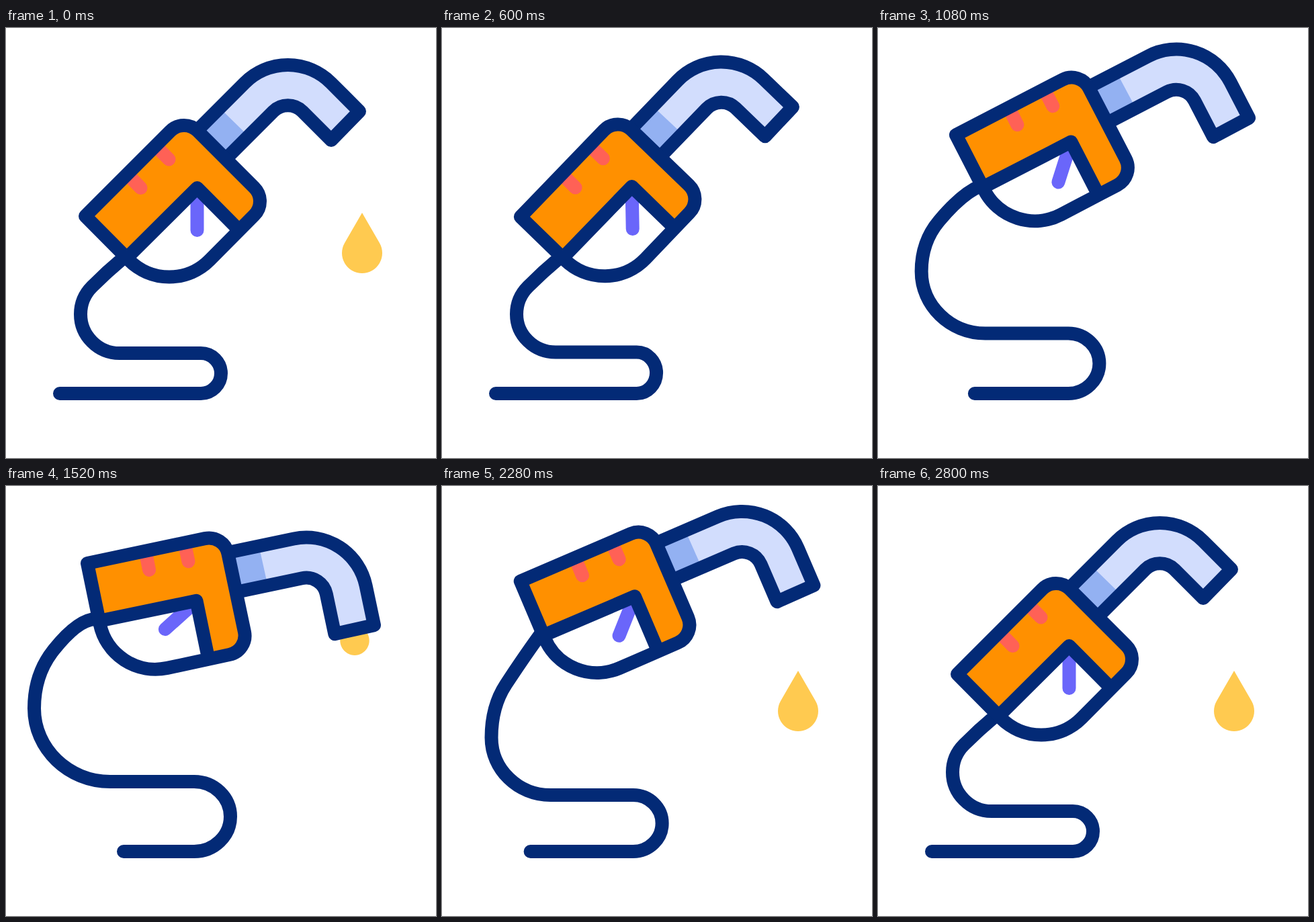
Recreate the animation shown at these times as an HTML page. Size 640 by 640 pixels, loop 3 s.

```html
<!DOCTYPE html>
<html lang="en">
<head>
<meta charset="utf-8">
<title>Fuel nozzle</title>
<style>
  html, body { margin: 0; width: 100%; height: 100%; overflow: hidden; background: #fff; }
  svg { display: block; width: 100vw; height: 100vh; }
  .line { fill: none; stroke: #032a76; stroke-width: 20; stroke-linecap: round; stroke-linejoin: round; }
  .mark { fill: none; stroke: #ff6156; stroke-width: 20; stroke-linecap: round; }
</style>
</head>
<body>
<svg viewBox="0 0 640 640">
  <path id="drop" fill="#ffca50" d="M0-60L26-15A30 30 0 1 1-26-15Z"/>
  <path id="hose" class="line"/>
  <g id="pump">
    <path fill="#d2ddfd" d="M290 147L355.5 81.5A90.5 90.5 0 0 1 483.5 81.5L526 124L484 167L441 124A30.5 30.5 0 0 0 398 124L332 190Z"/>
    <path fill="#93b1f2" d="M290 147L318 119L362 162L332 190Z"/>
    <path class="line" d="M290 147L355.5 81.5A90.5 90.5 0 0 1 483.5 81.5L526 124L484 167L441 124A30.5 30.5 0 0 0 398 124L332 190"/>
    <path fill="#fff" d="M180 342L183 345.5A84.5 84.5 0 0 0 303 345.5L347 301L284.5 238Z"/>
    <path id="lever" class="mark" style="stroke:#6a66fa" d="M284.5 240V301"/>
    <path fill="#ff9000" d="M118 280L244.5 153.5A29 29 0 0 1 285.5 153.5L369.5 237.5A29 29 0 0 1 369.5 278.5L347 301L284.5 238L180 342Z"/>
    <path class="mark" d="M223 176L242.5 195.5M181 218L200.5 238"/>
    <path class="line" d="M118 280L244.5 153.5A29 29 0 0 1 285.5 153.5L369.5 237.5A29 29 0 0 1 369.5 278.5L303 345.5A84.5 84.5 0 0 1 183 345.5ZM180 342L284.5 238L347 301"/>
  </g>
</svg>
<script>
const LOOP = 3000;
const [drop, hose, pump, lever] = ['drop', 'hose', 'pump', 'lever'].map(id => document.getElementById(id));

const ramp = (t, from, to) => Math.min(1, Math.max(0, (t - from) / (to - from)));
const easeOut = u => 1 - (1 - u) ** 1.6;
const glide = u => u + 0.12 * u * (1 - u);
// Rises from a to b, returns from c to d.
const swing = (t, ease, a, b, c, d) => ease(ramp(t, a, b)) - ease(ramp(t, c, d));

// joint x, y; left bulge x, y; middle line x, y; loop start x, loop right x; end x
const HOSE_REST = [128, 385, 111, 426, 169, 484, 290, 320, 80];
const HOSE_LIFT = [71, 244, 42, 331, 155, 440, 280, 334, 175];
const HOSE_KICK = [0, 0, 0, 0, 0, -11, -2, -7, 0];
const FLOOR = 544;

function hosePath(bx, by, lift, kick) {
  let [jx, jy, lx, ly, mx, my, sx, rx, ex] =
    HOSE_REST.map((v, i) => v + lift * (HOSE_LIFT[i] - v) + kick * HOSE_KICK[i]);
  // The joint follows the pump when the two are out of step.
  jx += 0.3 * (bx - (175 - 40 * lift));
  jy += 0.3 * (by - (342 - 144 * lift));
  const cx = jx - 0.65 * (jx - lx), cy = jy + 0.27 * (ly - jy);
  const w = rx - sx, h = (FLOOR - my) / 2;
  return `M${bx} ${by}Q${3 * jx - 2 * cx} ${3 * jy - 2 * cy} ${jx} ${jy}` +
    `C${cx} ${cy} ${lx} ${ly - 0.39 * (ly - jy)} ${lx} ${ly}` +
    `C${lx} ${ly + 0.55 * (my - ly)} ${mx - 0.55 * (mx - lx)} ${my} ${mx} ${my}H${sx}` +
    `C${sx + 0.55 * w} ${my} ${rx} ${my + 0.45 * h} ${rx} ${my + h}` +
    `C${rx} ${FLOOR - 0.45 * h} ${sx + 0.55 * w} ${FLOOR} ${sx} ${FLOOR}H${ex}`;
}

function draw(t) {
  const kick = swing(t, easeOut, 120, 400, 400, 680);
  const tilt = swing(t, glide, 800, 1360, 2040, 2800);
  const lift = swing(t, easeOut, 800, 1360, 2040, 2800);
  const pull = swing(t, easeOut, 1360, 1680, 1680, 2000);

  const dx = tilt * (14.5 * tilt - 11.5), dy = tilt * (133 * tilt - 298);
  const angle = 33.1 * tilt, rad = angle * Math.PI / 180;
  const cos = Math.cos(rad), sin = Math.sin(rad);
  pump.setAttribute('transform',
    `translate(${dx} ${dy}) rotate(${angle} 118 280) rotate(${-8 * kick} 175 342)`);
  lever.setAttribute('transform', `rotate(${22 * pull} 284.5 239)`);
  hose.setAttribute('d', hosePath(
    118 + dx + 57 * cos - 62 * sin, 280 + dy + 57 * sin + 62 * cos, lift, kick));

  let x = 530, y = 335, size = 1;
  if (t < 1360) {
    y += 380 * ramp(t, 120, 520) ** 2;
  } else {
    const left = 1 - ramp(t, 1360, 2000);
    x -= 14.7 * left;
    y -= 140 * left;
    size -= 0.37 * left;
  }
  drop.setAttribute('transform', `translate(${x} ${y}) scale(${size})`);
}

const start = performance.now();
function tick() {
  draw((performance.now() - start) % LOOP);
  requestAnimationFrame(tick);
}
tick();
</script>
</body>
</html>
```
